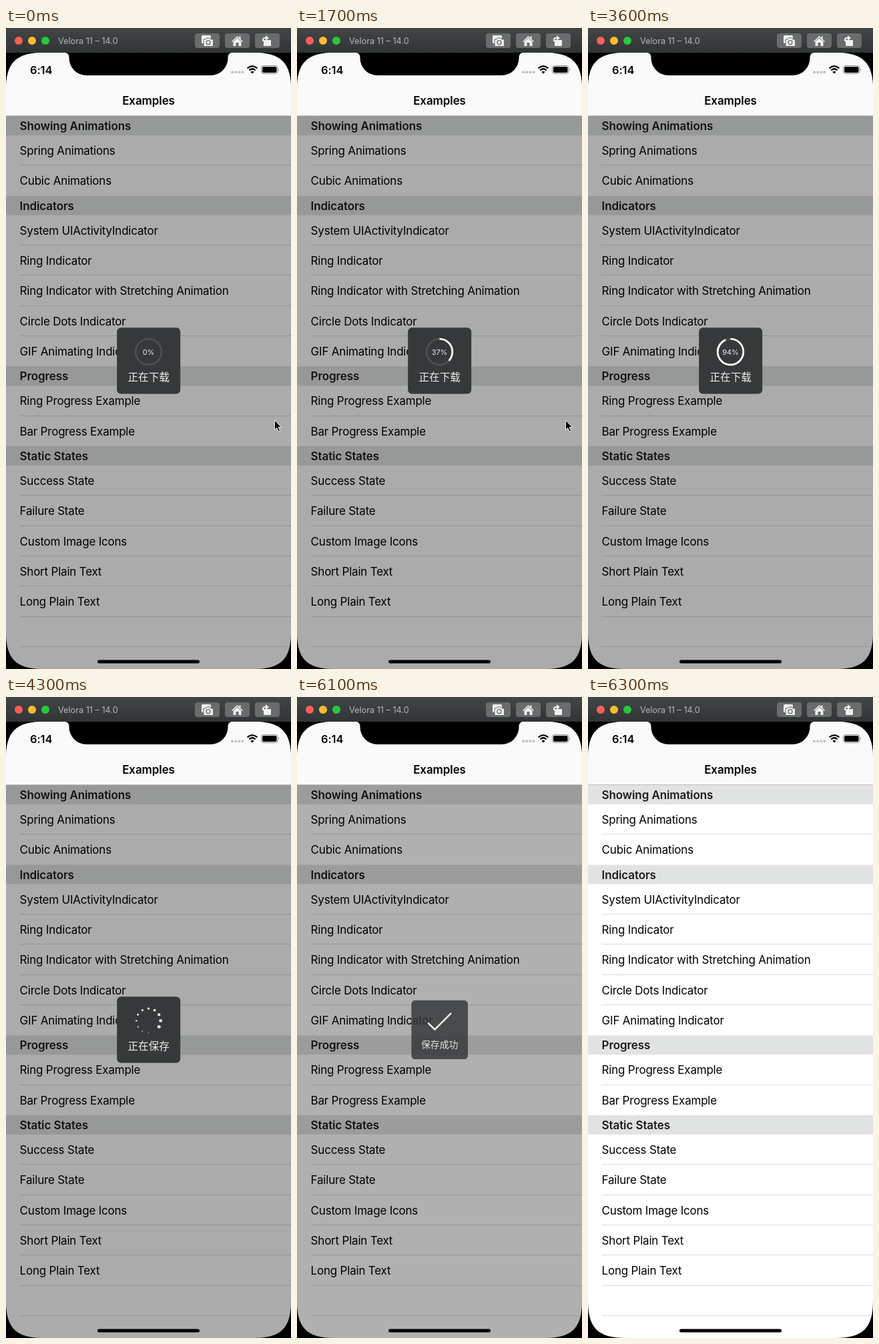
Write an HTML page that moves like this. It is 427 by 961 pixels and loops after 6.4 s.

```html
<!DOCTYPE html>
<html lang="en">
<head>
<meta charset="utf-8">
<title>HUD demo</title>
<style>
  html, body { margin: 0; width: 100%; height: 100%; overflow: hidden; background: #000; }
  svg { display: block; width: 100vw; height: 100vh; }
  text { font-family: Inter, "Noto Sans", sans-serif; font-size: 17px; }
  .row { letter-spacing: -.21px; }
  .head { font-weight: 600; letter-spacing: -.1px; }
  .mid { text-anchor: middle; }
  #label { font-family: "Noto Sans CJK SC", "Noto Sans CJK", sans-serif; font-size: 15.6px; fill: #eee; }
  #pct { font-size: 11px; fill: #eee; letter-spacing: -.1px; }
</style>
</head>
<body>
<svg viewBox="0 0 427 961" preserveAspectRatio="none">
  <defs>
    <linearGradient id="bar" x2="0" y2="1">
      <stop stop-color="#434647"/><stop offset="1" stop-color="#313435"/>
    </linearGradient>
    <clipPath id="screen">
      <path d="M0 93C0 52 15 37 56 37H371C412 37 427 52 427 93V905C427 946 412 961 371 961H56C15 961 0 946 0 905z"/>
    </clipPath>
  </defs>

  <rect width="427" height="961"/>
  <rect width="427" height="37" fill="url(#bar)"/>
  <circle cx="19" cy="19" r="6" fill="#ff5f57"/>
  <circle cx="39" cy="19" r="6" fill="#febc2e"/>
  <circle cx="59" cy="19" r="6" fill="#28c840"/>
  <text x="78" y="24" fill="#b3b5b6" style="font-size:12.7px">Velora 11 – 14.0</text>
  <g fill="#696b6c">
    <rect x="283" y="8" width="37" height="22" rx="4"/>
    <rect x="328" y="8" width="37" height="22" rx="4"/>
    <rect x="373" y="8" width="37" height="22" rx="4"/>
  </g>
  <g fill="#f0f0f0">
    <rect x="293" y="11" width="14" height="12" rx="1.500"/>
    <path d="M296 17h3l1.500-2h5l1.500 2h3.500v10.500h-14.500z" stroke="#696b6c"/>
    <circle cx="303" cy="21.700" r="3" fill="none" stroke="#696b6c" stroke-width="1.300"/>
    <path d="M338 20l8.500-8 3 2.800V12.500h2v4.200l3.500 3.300-1 1-7.500-7-7.500 7z"/>
    <path d="M340.500 20.500l6-5.500 6 5.500V27h-4v-5h-4v5h-4z"/>
    <rect x="386" y="18" width="11" height="9" rx="1"/>
    <path d="M384 20v-2q0-4 4-4h1v-3l5 4-5 4v-3h-1q-2 0-2 2v2z"/>
  </g>

  <g clip-path="url(#screen)">
    <rect y="37" width="427" height="924" fill="#fff"/>
    <g id="list"></g>
    <rect id="dim" y="132" width="427" height="829"/>
    <rect y="37" width="427" height="94.500" fill="#fafafa"/>
    <rect y="131.300" width="427" height=".8" fill="#a9a9a9"/>
    <path d="M88 37q6.500 0 6.500 8a26 26 0 0 0 26 26H306.500a26 26 0 0 0 26-26q0-8 6.500-8z"/>
    <text x="36" y="68.500" class="head" style="font-size:16.5px">6:14</text>
    <g fill="#c2c2c2">
      <circle cx="339" cy="66.300" r="2"/><circle cx="344.200" cy="66.300" r="2"/>
      <circle cx="349.300" cy="66.300" r="2"/><circle cx="354.400" cy="66.300" r="2"/>
    </g>
    <g fill="none" stroke="#000" stroke-width="2.300">
      <path d="M361.600 60.300q7.400-6.400 14.800 0"/>
      <path d="M364.400 63.300q4.600-4 9.200 0"/>
    </g>
    <path d="M366.400 65.700q2.600-2 5.200 0l-2.600 2.700z"/>
    <rect x="382.500" y="56.500" width="24.500" height="12" rx="3.500" fill="none" stroke="#8a8a8a"/>
    <rect x="384" y="58" width="21.500" height="9" rx="2"/>
    <path d="M408.200 60.500q2 2 0 4z" fill="#8a8a8a"/>
    <text x="213.500" y="115.300" class="head mid">Examples</text>
    <rect x="137" y="947.500" width="153" height="5" rx="2.500"/>
  </g>

  <g id="hud">
    <rect x="166.200" y="449.300" width="95" height="99.200" rx="6" fill="#35393a"/>
    <g id="ring" fill="none" stroke="#fff" stroke-width="2.800">
      <circle cx="213.500" cy="485.500" r="19.300" stroke-opacity=".11"/>
      <circle id="arc" cx="213.500" cy="485.500" r="19.300" pathLength="100" transform="rotate(-90 213.500 485.500)"/>
      <text id="pct" class="mid" x="213.500" y="489.500" stroke="none"></text>
    </g>
    <g id="dots" fill="#fff"></g>
    <path id="tick" d="M194 487L205.500 498.500L233.200 470.800" pathLength="100" fill="none" stroke="#fff" stroke-width="2.800"/>
    <text id="label" class="mid" x="213.700" y="529.300"></text>
  </g>
  <path id="cursor" d="M402.500 588v14.500l3.300-3 2.300 5.300 2.400-1-2.300-5.200h4.400z" stroke="#fff" stroke-width=".9"/>
</svg>
<script>
const $ = id => document.getElementById(id);
const LOOP = 6400, TICK = 100;
const POINTER_EXIT = 2400, SPIN = 4200, DONE = 5000, LEAVE = 6100;

const sections = {
  'Showing Animations': ['Spring Animations', 'Cubic Animations'],
  'Indicators': ['System UIActivityIndicator', 'Ring Indicator', 'Ring Indicator with Stretching Animation',
    'Circle Dots Indicator', 'GIF Animating Indicator'],
  'Progress': ['Ring Progress Example', 'Bar Progress Example'],
  'Static States': ['Success State', 'Failure State', 'Custom Image Icons', 'Short Plain Text',
    'Long Plain Text', '', '']
};

// Download jumps: start time, number of ticks, percent reached
const jumps = [[400, 4, 13], [900, 3, 33], [1400, 4, 37], [1900, 3, 52],
  [2400, 4, 59], [2900, 3, 79], [3400, 3, 94], [3900, 3, 100]];

function add(parent, tag, attrs, text = '') {
  const el = document.createElementNS('http://www.w3.org/2000/svg', tag);
  for (const k in attrs) el.setAttribute(k, attrs[k]);
  el.textContent = text;
  return parent.appendChild(el);
}

function buildList() {
  const list = $('list'), headH = 28.87, rowH = 45.38, left = 20.6;
  let y = 132;
  for (const [title, rows] of Object.entries(sections)) {
    add(list, 'rect', { y, width: 427, height: headH, fill: '#e1e2e2' });
    add(list, 'text', { x: left, y: y + 21, class: 'head', fill: '#1c1c1c' }, title);
    y += headH;
    rows.forEach((name, i) => {
      add(list, 'text', { x: left, y: y + 29, class: 'row' }, name);
      y += rowH;
      if (i < rows.length - 1)
        add(list, 'rect', { x: left, y: Math.round(y) - 1, width: 407, height: 1, fill: '#dcdcdc' });
    });
  }
}

const dots = Array.from({ length: 12 }, (_, i) => {
  const a = i * Math.PI / 6;
  return add($('dots'), 'circle', { cx: 213.5 + 18.2 * Math.sin(a), cy: 485.3 - 18.2 * Math.cos(a) });
});

const show = (id, on) => $(id).setAttribute('visibility', on ? 'visible' : 'hidden');
const clamp = v => Math.max(0, Math.min(1, v));
// Progress of a move that shows its first step at once
const steps = (t, start, n) => clamp((t - start + TICK) / (n * TICK));
const dash = (id, v) => $(id).setAttribute('stroke-dasharray', v + ' 200');

function drawRing(t) {
  let shown = 0, target = 0;
  for (const [start, n, value] of jumps) {
    if (t < start) break;
    shown = target + (value - target) * steps(t, start, n);
    target = value;
  }
  dash('arc', shown);
  $('pct').textContent = target + '%';
}

function drawDots(t) {
  const head = (t - 4900) / 1000;
  dots.forEach((dot, i) => {
    const age = (head - i / 12 + 8) % 1;
    dot.setAttribute('r', 2.6 - 2.2 * age);
  });
}

function drawTick(t) {
  const u = steps(t, DONE, 4);
  dash('tick', 100 * u * u * (3 - 2 * u));
}

function drawCursor(t) {
  const u = steps(t, POINTER_EXIT, 4);
  $('cursor').setAttribute('transform', `translate(${30 * u} ${85 * u})`);
}

function draw(time) {
  const t = Math.floor(time % LOOP / TICK) * TICK;
  const leaving = t >= LEAVE;
  show('ring', t < SPIN);
  show('dots', t >= SPIN && t < DONE);
  show('tick', t >= DONE);
  drawRing(t);
  drawDots(t);
  drawTick(t);
  drawCursor(t);
  $('label').textContent = t < SPIN ? '正在下载' : t < DONE ? '正在保存' : '保存成功';

  const out = (t - LEAVE) / TICK;
  $('dim').setAttribute('opacity', leaving ? [.31, .02, 0][out] : .33);
  $('hud').setAttribute('opacity', !leaving ? 1 : out < 1 ? .84 : 0);
  $('hud').setAttribute('transform', leaving ? 'translate(213.7 499) scale(.89) translate(-213.7 -499)' : '');
}

buildList();
const began = performance.now();
function frame() {
  draw(performance.now() - began);
  requestAnimationFrame(frame);
}
frame();
</script>
</body>
</html>
```
